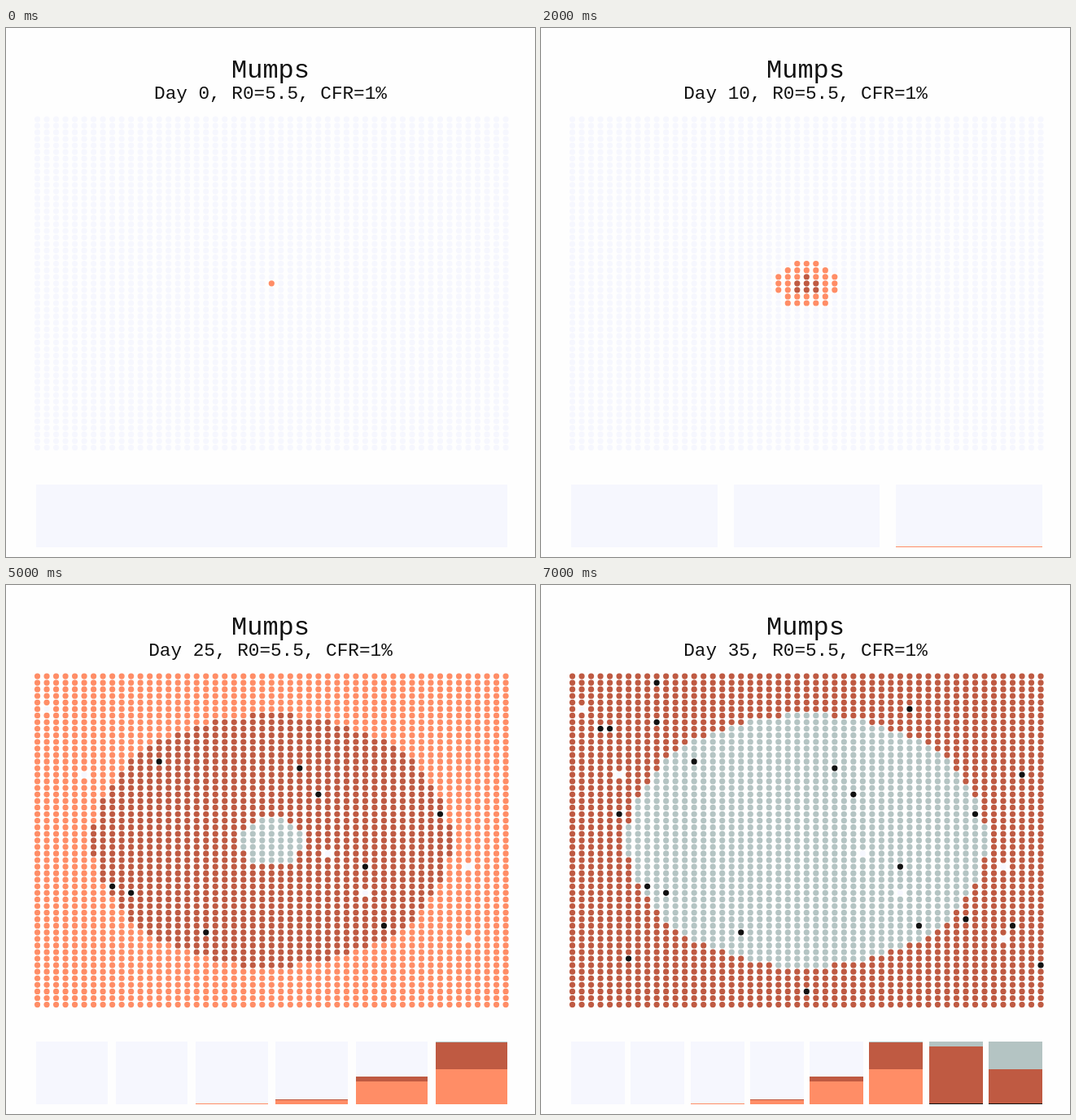
An HTML page with a canvas that plays this animation: 650x650 px, repeating every 8000 ms.

```html
<!DOCTYPE html>
<html lang="en">
<head>
<meta charset="utf-8">
<title>Mumps spread</title>
<style>
  html, body { margin: 0; width: 100%; height: 100%; overflow: hidden; background: #fefefe; }
  canvas { display: block; }
</style>
</head>
<body>
<canvas width="650" height="650"></canvas>
<script>
const ctx = document.querySelector('canvas').getContext('2d');

const STEP_MS = 1000, STEPS = 8, DAYS_PER_STEP = 5, HALF = 25;
const DEATHS = 21, IMMUNE = 6;
const COLORS = {
  dead: '#111111', infected: '#ff8d66', sick: '#bf5a42',
  healthy: '#f6f7fe', recovered: '#b4c4c3'
};
const STACK = Object.keys(COLORS); // bottom to top

let seed = 20231;
const random = () => (seed = seed * 16807 % 2147483647) / 2147483647;

// The disease spreads by distance; ties go bottom to top, then left to right.
const rank = (dx, dy) => (dx * dx + dy * dy) * 1e4 - dy * 100 + dx;
const lastOfWave = [[0, 0], [1, 1], [2, 3], [-1, -8], [-3, 19]].map(p => rank(...p));

const dots = [];
for (let dy = -HALF; dy <= HALF; dy++) {
  for (let dx = -HALF; dx <= HALF; dx++) {
    const wave = lastOfWave.findIndex(last => rank(dx, dy) <= last);
    dots.push({
      x: 326.3 + dx * 11.51,
      y: 313.8 + dy * 8.07,
      wave: wave < 0 ? lastOfWave.length : wave,
      dies: false
    });
  }
}
const randomDot = () => dots[Math.floor(random() * dots.length)];
for (let i = 0; i < DEATHS; i++) randomDot().dies = true;
for (let i = 0; i < IMMUNE; i++) randomDot().wave = Infinity;

function stateOf(dot, step) {
  const age = step - dot.wave;
  if (age < 0) return 'healthy';
  if (age === 0) return 'infected';
  if (dot.dies) return 'dead';
  return age < 3 ? 'sick' : 'recovered';
}

const history = Array.from({ length: STEPS }, (_, step) => {
  const counts = Object.fromEntries(STACK.map(s => [s, 0]));
  for (const dot of dots) counts[stateOf(dot, step)]++;
  return counts;
});

function fillRect(color, x0, y0, x1, y1) {
  ctx.fillStyle = color;
  ctx.fillRect(x0, y0, x1 - x0, y1 - y0);
}

function drawPanel(counts, x0, x1) {
  const top = 561, bottom = 638;
  let sum = 0, y = bottom;
  for (const state of STACK) {
    sum += counts[state];
    const next = Math.round(bottom - (bottom - top) * sum / dots.length);
    fillRect(COLORS[state], x0, next, x1, y);
    y = next;
  }
}

function drawText(text, size, y) {
  ctx.font = `${size}px "Liberation Mono", monospace`;
  ctx.fillStyle = '#111';
  ctx.textAlign = 'center';
  ctx.fillText(text, 325, y);
}

function draw(step) {
  fillRect('#fefefe', 0, 0, 650, 650);
  drawText('Mumps', 32, 61);
  drawText(`Day ${step * DAYS_PER_STEP}, R0=5.5, CFR=1%`, 22.7, 87);

  for (const dot of dots) {
    ctx.fillStyle = COLORS[stateOf(dot, step)];
    ctx.beginPath();
    ctx.arc(dot.x, dot.y, 3.6, 0, 2 * Math.PI);
    ctx.fill();
  }

  const width = 579 / (step + 1 + step / 9); // gaps are a ninth of a panel
  for (let i = 0; i <= step; i++) {
    const x = 37 + i * width * 10 / 9;
    drawPanel(history[i], Math.round(x), Math.round(x + width));
  }
}

let shown = -1;
function tick() {
  const step = Math.floor(performance.now() / STEP_MS) % STEPS;
  if (step !== shown) draw(shown = step);
  requestAnimationFrame(tick);
}
tick();
</script>
</body>
</html>
```
